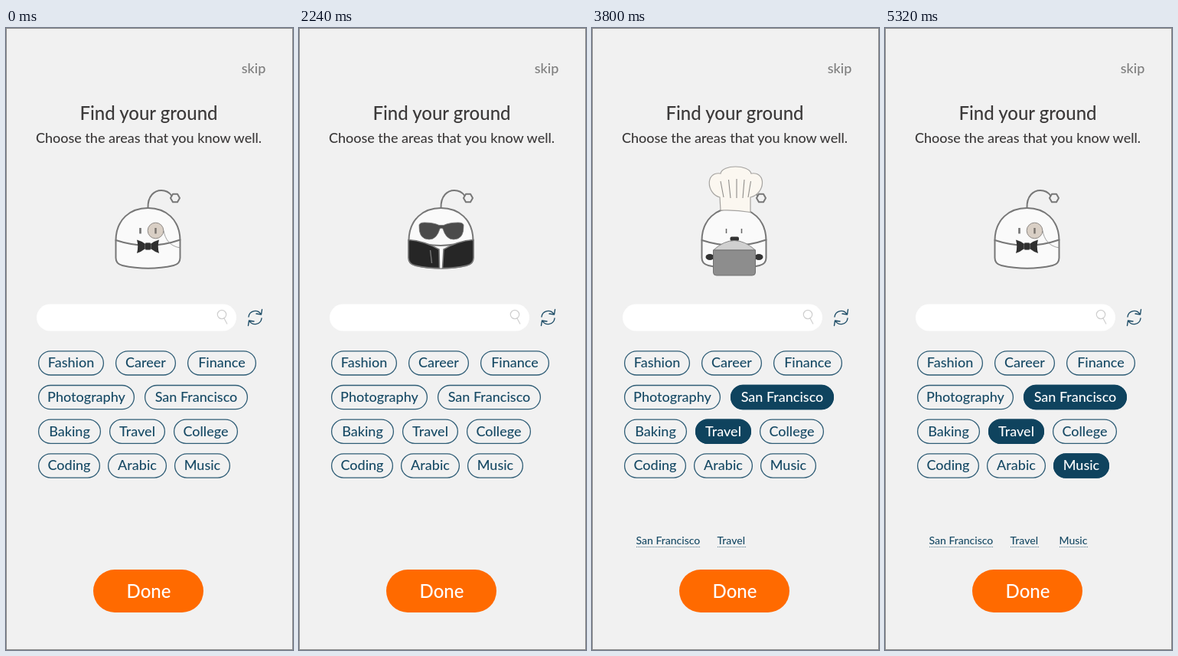
An HTML page for the animation above (6 s loop, 375 px wide and 812 px high).

```html
<!DOCTYPE html>
<html lang="en">
<head>
<meta charset="utf-8">
<title>Find your ground</title>
<style>
  html, body { margin: 0; width: 100%; height: 100%; overflow: hidden; background: #f1f1f1; }
  svg { display: block; width: 375px; height: 812px; }
  text { font-family: Lato, "Open Sans", sans-serif; font-weight: 500; }
  .mid { text-anchor: middle; }
  .ink { fill: none; stroke: #777; stroke-width: 2; stroke-linejoin: round; stroke-linecap: round; }
  .part { transform-box: fill-box; transform-origin: center; }
  .chip text, .tag text { fill: #174a65; }
  .chip text { font-size: 18px; text-anchor: middle; }
  .chip rect { fill: none; stroke: #2f5d76; stroke-width: 1.3; }
  .chip.on rect { fill: #0f435e; stroke: #0f435e; }
  .chip.on text { fill: #fff; }
  .tag text { font-size: 14px; }
  .tag line { stroke: #174a65; stroke-dasharray: 1 1; opacity: .75; }
</style>
</head>
<body>
<svg viewBox="0 0 375 812">
  <rect width="375" height="812" fill="#f1f1f1"/>
  <rect x=".5" y=".5" width="374" height="811" fill="none" stroke="#8a8a8a"/>

  <text x="323.5" y="59" class="mid" font-size="18" fill="#7d7d7d">skip</text>
  <text x="186.5" y="120" class="mid" font-size="24" fill="#3c3a3a">Find your ground</text>
  <text x="186.5" y="150" class="mid" font-size="18" fill="#3c3a3a">Choose the areas that you know well.</text>

  <!-- robot -->
  <path class="ink" d="M185.5 235 C185 219 194 212 203 212 C209 212 213 214 216.500 219"/>
  <path class="ink" fill-opacity="1" style="fill:#f1f1f1" d="M215 222 L218 216.700 H224 L227 222 L224 227.300 H218 Z"/>
  <path class="ink" style="fill:#fafafa" d="M143.500 277 C144 250 162 235 185.500 235 S227 250 227.500 277 V300 Q227.500 308 219 310 Q186 317.500 152 310 Q143.500 308 143.500 300 Z"/>
  <path class="ink" d="M143.500 277 Q186 291 227.500 276.500"/>
  <path d="M175.500 262 V268 M195.500 262 V268" stroke="#666" stroke-width="1.500"/>

  <g class="outfit">
    <path class="part" d="M175.500 261 V268.500" stroke="#777" stroke-width="2.600"/>
    <g class="part">
      <circle cx="195.500" cy="264.500" r="10.300" fill="#d9cfc5" stroke="#8d8884"/>
      <path d="M195.500 261 V268.500" stroke="#77716c" stroke-width="2.400"/>
      <path d="M206 264.500 C208 276 214 285 228 287" fill="none" stroke="#8a8a8a" stroke-width=".8"/>
    </g>
    <g class="part" fill="#303030">
      <path d="M171 276.500 Q177 278 182 282 V288 Q177 292 171 294 Q173.500 285 171 276.500 Z"/>
      <path d="M200 276.500 Q194 278 189 282 V288 Q194 292 200 294 Q197.500 285 200 276.500 Z"/>
      <rect x="181.500" y="280.500" width="8" height="9" rx="2" stroke="#777" stroke-width=".7"/>
    </g>
  </g>

  <g class="outfit">
    <g class="part">
      <path class="ink" style="fill:#1b225c" d="M143 277 Q186 291 228 276.500 V300 Q228 308 219 310 Q186 317.500 152 310 Q143 308 143 300 Z"/>
      <path d="M173 282 Q186 286 198 282 L185.500 314 Z" fill="#fafafa"/>
      <path d="M181.500 284 H189.500 L188 290 L189.500 307 L185.500 313 L181.500 307 L183 290 Z" fill="#262626"/>
      <path class="ink" stroke-width="1.600" d="M173 283 L159.500 290 L166 295.500 L160 299.500 L183 313 L173 283 M198 283 L211.500 290 L205 295.500 L211 299.500 L188 313 L198 283"/>
    </g>
  </g>

  <g class="outfit">
    <g class="part">
      <path d="M157 257 Q158 254 164 254 Q176 254 183 257.500 H189 Q196 254 208 254 Q214 254 215 257 Q216 276 202 276 Q192 276 188 262 Q186 260.500 184 262 Q180 276 170 276 Q156 276 157 257 Z" fill="#4b4b4b" stroke="#777" stroke-width=".8"/>
    </g>
    <g class="part">
      <path d="M143 277 L183 288 H188 L228 277 V301 Q227 309 219 310 Q186 317 152 310 Q143 308 143 300 Z" fill="#fafafa"/>
      <g class="ink" style="fill:#262626;stroke-width:1.600">
        <path d="M143 276.500 Q164 278 183 289 L183.500 313.500 Q166 313.500 152 310 Q143 308 143 300 Z"/>
        <path d="M228 276.500 Q207 278 189 289 L187.500 313.500 Q205 313.500 219 310 Q228 308 228 300 Z"/>
      </g>
      <path d="M171.500 290 L173.500 307" stroke="#777" stroke-width="1.400"/>
    </g>
  </g>

  <g class="outfit">
    <g class="part">
      <path d="M168 238 L167 221 C149 216 148 187 168 190 C170 178 205 178 208 190 C228 187 227 216 207 221 V240.500 Q187 237 168 238 Z" fill="#fbf7f0" stroke="#a5a3a0" stroke-width="1.200"/>
      <path d="M168 200 L172 221 M178.500 198 L181 222 M189 197 V222 M199 198 L197 222 M207.500 200 L204 221" stroke="#8f8d8a" stroke-width="1.100"/>
    </g>
    <g class="part">
      <g fill="#333">
        <ellipse cx="154" cy="299" rx="5.500" ry="4"/>
        <ellipse cx="218" cy="299" rx="5.500" ry="4"/>
        <rect x="180.500" y="272.500" width="11.500" height="5.500" rx="2"/>
      </g>
      <path d="M158.500 290 Q186 265 213.500 290 Z" fill="#d0d0d0" stroke="#858585"/>
      <path d="M158.500 290 H213.500 V319 Q213.500 323 209.500 323 H162.500 Q158.500 323 158.500 319 Z" fill="#8d8d8d" stroke="#717171"/>
    </g>
  </g>

  <!-- search -->
  <rect x="40" y="360.500" width="261" height="35" rx="17.500" fill="#fff"/>
  <g fill="none" stroke="#cfcfcf" stroke-width="1.200">
    <circle cx="282" cy="374" r="5.700"/>
    <path d="M285 379 L289 386.500"/>
  </g>
  <g fill="none" stroke="#1d4c66" stroke-width="1.400" stroke-linecap="round" stroke-linejoin="round">
    <path id="turn" d="M317 377 A8.700 8.700 0 0 1 333 373.500 M334.500 367.500 L333.500 374 L327 373"/>
    <use href="#turn" transform="rotate(180 325.500 378)"/>
  </g>

  <g id="chips"></g>
  <g id="tags"></g>

  <rect x="114" y="707" width="144" height="56" rx="28" fill="#ff6a00"/>
  <text x="186.500" y="744" class="mid" font-size="24" fill="#fff">Done</text>
</svg>
<script>
const LOOP = 6000;

// label, left, right, row
const CHIPS = [
  ["Fashion", 42, 128, 0], ["Career", 143, 222, 0], ["Finance", 237, 327, 0],
  ["Photography", 42, 168, 1], ["San Francisco", 181, 316, 1],
  ["Baking", 42, 124, 2], ["Travel", 135, 208, 2], ["College", 219, 303, 2],
  ["Coding", 42, 123, 3], ["Arabic", 133, 210, 3], ["Music", 220, 293, 3]
];

// label, selection start, tag left, tag right
const PICKS = [
  ["San Francisco", 2640, 58, 141],
  ["Travel", 3560, 164, 201],
  ["Music", 4740, 228, 265]
];
const PICK_TIME = 240;

// outfit change: start, from, to
const CHANGES = [[480, 0, 1], [1980, 1, 2], [3500, 2, 3], [5060, 3, 0]];
const CHANGE_TIME = 260;
const GROW = 0.25;

const $ = id => document.getElementById(id);

function add(parent, name, attrs, text) {
  const el = document.createElementNS("http://www.w3.org/2000/svg", name);
  for (const key in attrs) el.setAttribute(key, attrs[key]);
  if (text) el.textContent = text;
  parent.appendChild(el);
  return el;
}

function addChip([label, left, right, row], on) {
  const top = 421.8 + row * 44.7;
  const g = add($("chips"), "g", { class: on ? "chip on" : "chip" });
  add(g, "rect", { x: left + .6, y: top, width: right - left - 1.2, height: 31.2, rx: 15.6 });
  add(g, "text", { x: (left + right) / 2, y: Math.round(top + 21.4) }, label);
  return g;
}

CHIPS.forEach(chip => addChip(chip, false));

const picks = PICKS.map(([label, start, left, right]) => {
  const chip = addChip(CHIPS.find(c => c[0] === label), true);
  const tag = add($("tags"), "g", { class: "tag" });
  add(tag, "text", { x: left - .5, y: 674 }, label);
  add(tag, "line", { x1: left, x2: right, y1: 677.5, y2: 677.5 });
  return { start, chip, tag };
});

const outfits = [...document.querySelectorAll(".outfit")].map(el => ({
  el, parts: [...el.querySelectorAll(".part")]
}));

const progress = (t, start, span) => Math.min(1, Math.max(0, (t - start) / span));

function pose(outfit, opacity, scale) {
  outfit.el.style.display = opacity > 0 ? "" : "none";
  for (const part of outfit.parts) {
    part.style.opacity = opacity;
    part.style.transform = `scale(${scale})`;
  }
}

function draw(t) {
  for (const { start, chip, tag } of picks) {
    const p = progress(t, start, PICK_TIME);
    chip.style.opacity = p;
    tag.style.opacity = p * p;
  }

  const poses = outfits.map((_, i) => [i === 0 ? 1 : 0, 1]);
  for (const [start, from, to] of CHANGES) {
    const p = progress(t, start, CHANGE_TIME);
    if (p === 0) break;
    poses[from] = [1 - p, 1 + GROW * p ** 2.5];
    poses[to] = [p, 1 + GROW * (1 - p)];
  }
  outfits.forEach((outfit, i) => pose(outfit, ...poses[i]));
}

const begin = performance.now();
function tick() {
  draw((performance.now() - begin) % LOOP);
  requestAnimationFrame(tick);
}
tick();
</script>
</body>
</html>
```
